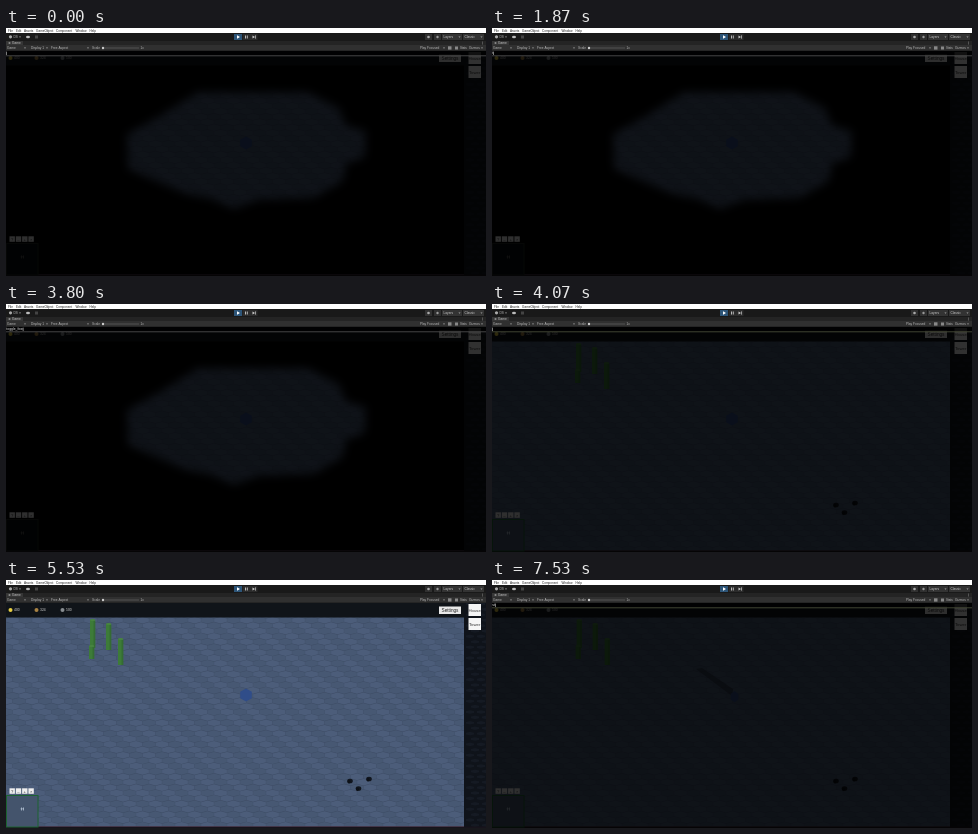
An HTML page with a canvas for the animation above (7.59 s loop, 480 by 248 pixels).

```html
<!DOCTYPE html>
<html lang="en">
<head>
<meta charset="utf-8">
<style>
html, body { margin: 0; width: 100%; height: 100%; overflow: hidden; background: #000; }
canvas { display: block; width: 480px; height: 248px; }
</style>
</head>
<body>
<canvas id="stage" width="480" height="248"></canvas>
<script>
const W = 480, H = 248, LOOP = 7590;
const ctx = document.getElementById('stage').getContext('2d');

function layer(paint) {
  const canvas = document.createElement('canvas');
  canvas.width = W;
  canvas.height = H;
  paint(canvas.getContext('2d'));
  return canvas;
}

function rect(c, x, y, w, h, color) {
  c.fillStyle = color;
  c.fillRect(x, y, w, h);
}

function oval(c, x, y, rx, ry, color) {
  c.fillStyle = color;
  c.beginPath();
  c.ellipse(x, y, rx, ry, 0, 0, Math.PI * 2);
  c.fill();
}

function poly(c, points, color) {
  c.fillStyle = color;
  c.beginPath();
  points.forEach(([x, y]) => c.lineTo(x, y));
  c.closePath();
  c.fill();
}

function text(c, label, x, y, size, color, align = 'left') {
  c.font = `${size}px "Liberation Sans", Arial, sans-serif`;
  c.textAlign = align;
  c.fillStyle = color;
  c.fillText(label, x, y);
}

function hex(c, x, y, rx, ry, color) {
  poly(c, [[x, y - ry], [x + rx, y - ry / 2], [x + rx, y + ry / 2],
    [x, y + ry], [x - rx, y + ry / 2], [x - rx, y - ry / 2]], color);
}

const arrow = (c, x, y) =>
  poly(c, [[x - 1, y - 0.6], [x + 1, y - 0.6], [x, y + 0.7]], '#aaa');

const editor = layer(c => {
  rect(c, 0, 0, W, 5, '#fff');
  [['File', 2], ['Edit', 10], ['Assets', 18], ['GameObject', 30],
    ['Component', 50], ['Window', 69.5], ['Help', 83.5]]
    .forEach(([label, x]) => text(c, label, x, 3.6, 3.1, '#222'));

  rect(c, 0, 5, W, 8, '#191919');
  oval(c, 4.5, 8.8, 1.6, 1.6, '#aaa');
  text(c, 'DS', 7.5, 10, 3.2, '#bbb');
  arrow(c, 14, 9);
  oval(c, 22, 9, 2, 1.3, '#bbb');
  rect(c, 29, 7.5, 3, 3, '#444');
  rect(c, 228, 6, 8, 6, '#2d5578');
  poly(c, [[231, 7.2], [234, 9], [231, 10.8]], '#fff');
  rect(c, 236.5, 6, 15, 6, '#2b2b2b');
  rect(c, 239, 7.5, 0.9, 3, '#ccc');
  rect(c, 240.8, 7.5, 0.9, 3, '#ccc');
  poly(c, [[246.5, 7.4], [249, 9], [246.5, 10.6]], '#ccc');
  rect(c, 249, 7.4, 0.7, 3.2, '#ccc');
  rect(c, 419, 6, 7, 6, '#303030');
  oval(c, 422.5, 9, 1.3, 1.3, '#aaa');
  rect(c, 428, 6, 7, 6, '#303030');
  oval(c, 431.5, 9, 1.2, 1.2, '#999');
  rect(c, 436, 6, 20, 6, '#333');
  text(c, 'Layers', 437.5, 10, 3.2, '#ccc');
  arrow(c, 453.5, 9);
  rect(c, 457, 6, 21, 6, '#333');
  text(c, 'Classic', 458.5, 10, 3.2, '#ccc');
  arrow(c, 475.5, 9);

  rect(c, 0, 13, W, 4, '#242424');
  rect(c, 0, 13, 17, 4, '#363636');
  oval(c, 3.5, 15, 1.1, 0.8, '#aaa');
  text(c, 'Game', 6, 16.2, 3.2, '#ccc');
  for (let i = 0; i < 3; i++) rect(c, 476, 13.7 + i, 0.7, 0.6, '#aaa');

  rect(c, 0, 17, W, 6, '#303030');
  [['Game', 1, 19], ['Display 1', 25, 41], ['Free Aspect', 45, 82], ['Play Focused', 414, 438]]
    .forEach(([label, x, end]) => {
      text(c, label, x, 21.1, 3.2, '#bbb');
      arrow(c, end, 20);
    });
  text(c, 'Scale', 86, 21.1, 3.2, '#bbb');
  rect(c, 96, 19.7, 37, 0.6, '#666');
  oval(c, 97, 20, 1.2, 1.2, '#ccc');
  text(c, '1x', 134.5, 21.1, 3, '#bbb');
  rect(c, 442, 18.3, 3.5, 3.3, '#888');
  rect(c, 449, 18.5, 3, 3, '#888');
  text(c, 'Stats', 454, 21.1, 3, '#bbb');
  text(c, 'Gizmos', 463, 21.1, 3.2, '#bbb');
  arrow(c, 476, 20);
  rect(c, 0, 22.6, W, 0.4, '#151515');
});

const ground = layer(c => {
  rect(c, 0, 23, W, 225, '#3f4d66');
  for (let row = 0; row < 44; row++) {
    for (let col = -1; col < 39; col++) {
      const x = col * 13 + (row % 2) * 6.5;
      hex(c, x, 24 + row * 5.4, 6.4, 3.3, (col + (row >> 1)) % 2 ? '#4c5d7a' : '#475873');
    }
  }
  rect(c, 458, 23, 22, 225, '#0f131a');
  for (let row = 0; row < 44; row++) {
    for (let col = 0; col < 2; col++) {
      hex(c, 464 + col * 11 + (row % 2) * 5, 24 + row * 5.4, 4, 1.8, '#151a23');
    }
  }
});

const fog = layer(c => {
  rect(c, 0, 37, 458, 210, '#000');
  c.globalCompositeOperation = 'destination-out';
  c.filter = 'blur(4px)';
  poly(c, [[192, 64], [302, 64], [333, 80], [340, 97], [360, 103], [359, 129],
    [340, 136], [337, 153], [308, 170], [252, 172], [228, 181], [205, 171],
    [180, 166], [122, 141], [121, 106], [152, 89]], '#fff');
});

const hud = layer(c => {
  rect(c, 0, 23, 458, 14.5, '#101419');
  [[4.5, '#e8cf43', '400'], [30.5, '#a88243', '324'], [56.5, '#878c90', '500']]
    .forEach(([x, color, amount]) => {
      oval(c, x, 30, 2, 2, color);
      text(c, amount, x + 3.5, 31.2, 3.4, '#d8d8d8');
    });
  rect(c, 433, 26.5, 22, 7.5, '#e9e9e9');
  text(c, 'Settings', 444, 32, 4.7, '#222', 'center');
  [['House', 24], ['Tower', 38]].forEach(([label, y]) => {
    rect(c, 462.5, y, 12.5, 12, '#f5f5f5');
    text(c, label, 468.7, y + 7.5, 4.3, '#333', 'center');
  });
  ['?', '–', '+', '×'].forEach((label, i) => {
    const x = 3.5 + i * 6.3;
    rect(c, x, 208.3, 5.4, 5.5, '#eee');
    text(c, label, x + 2.7, 212.6, 4.2, '#333', 'center');
  });
  rect(c, 0, 246.5, W, 1.5, '#17131b');
  rect(c, 32, 246.3, 426, 0.6, '#51384a');
});

function drawMinimap(fogged) {
  rect(ctx, 0, 215, 32, 32, fogged ? '#070a0d' : '#44546c');
  ctx.strokeStyle = fogged ? '#1c2520' : '#1c6331';
  ctx.lineWidth = 1;
  ctx.strokeRect(0.5, 215.5, 31.5, 31.5);
  const mark = fogged ? '#555' : '#b5c2d4';
  rect(ctx, 15, 227.5, 0.8, 3, mark);
  rect(ctx, 17, 227.5, 0.8, 3, mark);
  rect(ctx, 14.5, 228.6, 3.5, 0.6, mark);
}

function drawWorld(t) {
  const fogged = t < 4070;
  const walk = t < 7070 ? 0 : (Math.floor((t - 7070) / 77) + 1) / 7;
  const step = Math.min(walk, 1);
  ctx.drawImage(ground, 0, 0);

  // A faint trail appears behind the unit as it moves.
  ctx.globalAlpha = step * 0.4;
  poly(ctx, [[204, 89], [210, 88], [241, 109], [240, 116]], '#0c1118');
  ctx.globalAlpha = 1;

  [[84, 40, 28], [83, 66, 13], [100, 44, 26], [112, 59, 26]].forEach(([x, y, h]) => {
    rect(ctx, x + step * 0.7, y, 5.2, h, '#3d7b38');
    rect(ctx, x + 3.6 + step * 0.7, y + 1, 1.6, h - 1, '#346c32');
    oval(ctx, x + 2.6 + step * 0.7, y, 2.6, 1, '#488540');
  });
  const x = 240 + step * 3, y = 115 + step * 2;
  hex(ctx, x, y, 5.8 - step * 2.3, 6.5 - step, '#304d89');
  [[344, 201], [352.5, 208.5], [363, 199]].forEach(([rx, ry]) => {
    oval(ctx, rx, ry, 2.8, 2.3, '#11161e');
    oval(ctx, rx - 1, ry + 0.7, 1.5, 1.7, '#0c1016');
  });
  if (fogged) ctx.drawImage(fog, 0, 0);
  ctx.drawImage(hud, 0, 0);
  drawMinimap(fogged);
}

const toggleKeys = [1870, 2000, 2130, 2270, 2330, 2470, 3070, 3470, 3530, 3800];
const nextKeys = [7070, 7300];

function typed(t) {
  const count = keys => keys.filter(time => time <= t).length;
  return t < 4070 ? 'toggle_fow'.slice(0, count(toggleKeys)) : 'st'.slice(0, count(nextKeys));
}

function caretOn(t) {
  return t < 270 || (t >= 600 && t < 1400) || (t >= 1870 && t < 4870) || t >= 6470;
}

function drawConsole(t) {
  rect(ctx, 0, 23, W, 225, 'rgba(0,0,0,.8)');
  rect(ctx, 0, 23, W, 5, 'rgba(0,0,0,.65)');
  rect(ctx, 0, 27.5, W, 0.7, t < 4070 ? '#626262' : '#5a6047');
  const entry = typed(t);
  text(ctx, entry, 0.3, 26.3, 3.4, '#eee');
  if (caretOn(t)) {
    const x = 0.4 + ctx.measureText(entry).width;
    rect(ctx, x, 23.6, 0.6, 3.4, '#ccc');
  }
}

function frame(now) {
  const t = now % LOOP;
  drawWorld(t);
  if (t < 5530 || t >= 6470) drawConsole(t);
  ctx.drawImage(editor, 0, 0);
  requestAnimationFrame(frame);
}
frame(0);
</script>
</body>
</html>
```
